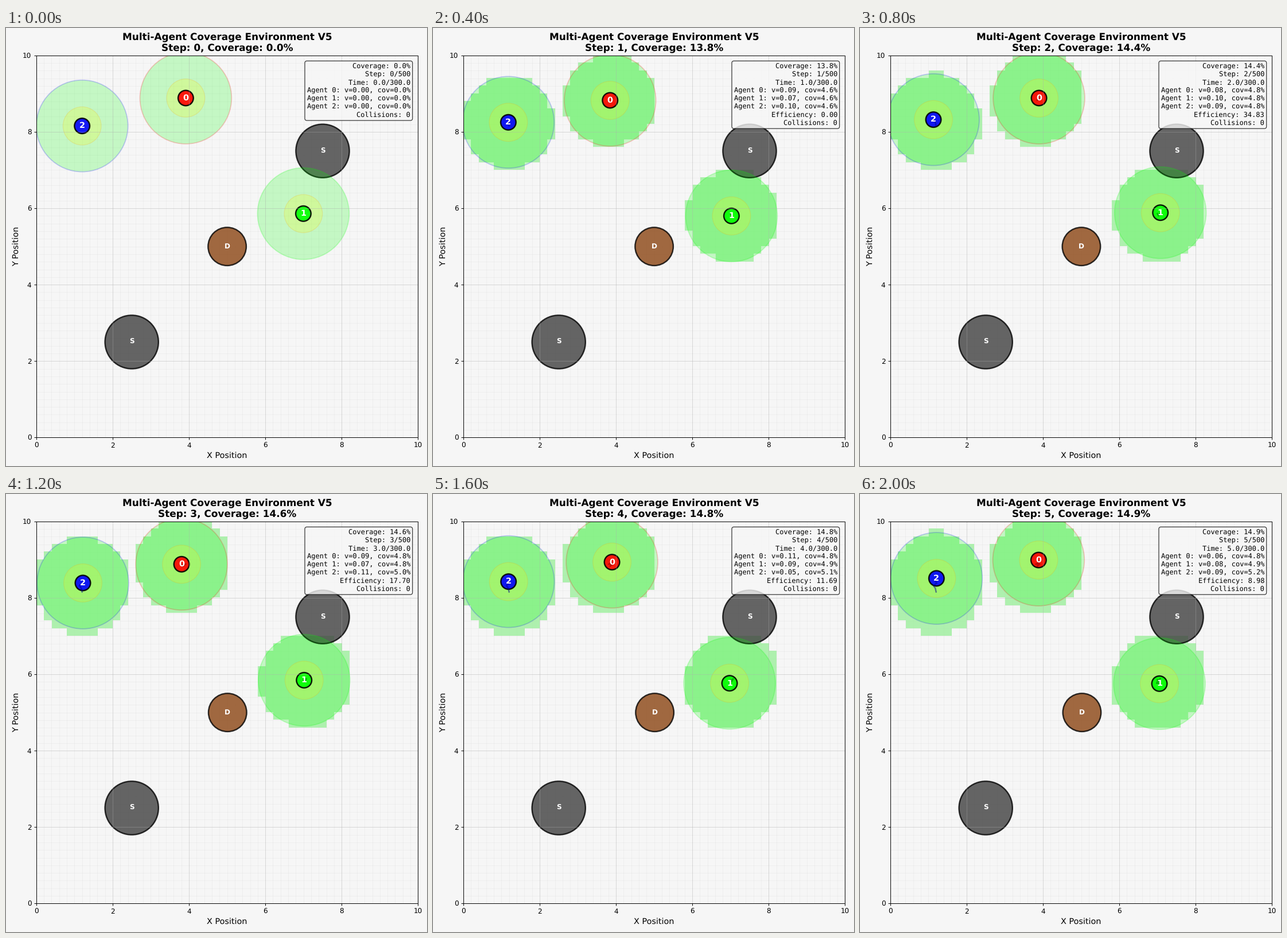
Animation, 734 px wide and 763 px high, one loop 2400 ms. Source, as a matplotlib script:

```python
import numpy as np
import matplotlib.pyplot as plt
from matplotlib.animation import FuncAnimation
from matplotlib.patches import Circle

W, H, DPI = 734, 763, 100
K = 0.867  # scale of all point sizes
BG = "#f6f6f6"
SIZE, CELL = 10, 0.2
SENSE, COMM, BODY = 1.2, 0.5, 0.2

plt.rcParams.update({
    "font.family": "DejaVu Sans",
    "font.size": 10 * K,
    "text.hinting": "none",
    "axes.linewidth": 0.8 * K,
    "axes.labelpad": 4 * K,
    "axes.titlepad": 6 * K,
})
for axis in ("xtick", "ytick"):
    plt.rcParams.update({f"{axis}.major.size": 3.5 * K,
                         f"{axis}.major.width": 0.8 * K,
                         f"{axis}.major.pad": 3.5 * K})

COLORS = [(1, 0, 0), (0, 1, 0), (0, 0, 1)]
TRAILS = ["darkred", "darkgreen", "darkblue"]

# way points of each agent; speed and coverage follow from them
PATHS = np.array([
    [(3.915, 8.885), (3.845, 8.825), (3.895, 8.885),
     (3.805, 8.88), (3.895, 8.935), (3.885, 8.99)],
    [(6.995, 5.86), (7.025, 5.80), (7.075, 5.885),
     (7.015, 5.845), (6.975, 5.765), (7.05, 5.755)],
    [(1.20, 8.155), (1.18, 8.25), (1.13, 8.32),
     (1.22, 8.39), (1.185, 8.425), (1.21, 8.51)],
])
STEPS = PATHS.shape[1]
EFFICIENCY = [0.00, 34.83, 17.70, 11.69, 8.98]  # from step 1 on

fig = plt.figure(figsize=(W / DPI, H / DPI), dpi=DPI, facecolor=BG)
left, top, side = 52.8, 47.8, 665.6
ax = fig.add_axes([left / W, 1 - (top + side) / H, side / W, side / H],
                  facecolor=BG)

# fine cell lines, covered cells, main grid
ticks = np.arange(0, SIZE + CELL / 2, CELL)
fine = dict(colors="gray", alpha=0.1, linewidth=0.5 * K, zorder=0.2)
ax.vlines(ticks, 0, SIZE, **fine)
ax.hlines(ticks, 0, SIZE, **fine)
mid = ticks[:-1] + CELL / 2
gx, gy = np.meshgrid(mid, mid)
cells = np.zeros(gx.shape + (4,))
cells[..., :3] = np.array([144, 238, 144]) / 255
cover = ax.imshow(cells, extent=(0, SIZE, 0, SIZE), origin="lower",
                  interpolation="nearest", aspect="auto", zorder=0.5)
ax.grid(True, color="#b0b0b0", alpha=0.4, linewidth=0.8 * K)

ax.set_xlim(0, SIZE)
ax.set_ylim(0, SIZE)
ax.set_xticks(range(0, SIZE + 1, 2))
ax.set_yticks(range(0, SIZE + 1, 2))
ax.set_xlabel("X Position", fontsize=12 * K)
ax.set_ylabel("Y Position", fontsize=12 * K)
title = ax.set_title("", fontsize=14 * K, fontweight="bold")


def disc(radius, face, edge, width, alpha, at=(0, 0)):
    return ax.add_patch(Circle(at, radius, facecolor=face, edgecolor=edge,
                               linewidth=width * K, alpha=alpha))


def label(text, size, at=(0, 0)):
    return ax.text(*at, text, color="white", fontsize=size * K,
                   fontweight="bold", ha="center", va="center")


def obstacle(at, radius, face, letter):
    return disc(radius, face, "black", 2, 0.8, at), label(letter, 10, at)


obstacle((2.5, 2.5), 0.7, "#404040", "S")
obstacle((7.5, 7.5), 0.7, "#404040", "S")
drifter = obstacle((5, 5), 0.5, "saddlebrown", "D")

agents, trails = [], []
for i, color in enumerate(COLORS):
    agents.append((
        disc(SENSE, "lime", color, 1.5, 0.2),
        disc(COMM, "yellow", "orange", 1, 0.2),
        disc(BODY, color, "black", 2, 0.9),
        label(str(i), 12),
    ))
    trails += ax.plot([], [], color=TRAILS[i], alpha=0.5, linewidth=2 * K)

info = ax.text(0.98, 0.98, "", transform=ax.transAxes, ha="right", va="top",
               fontsize=10 * K, family="DejaVu Sans Mono", linespacing=1.26,
               zorder=5,
               bbox=dict(boxstyle="round", facecolor="#f7f7f7",
                         edgecolor="black", alpha=0.8, linewidth=K))


def covered(path, step):
    """Cells whose centre one agent has had in sensing range so far."""
    seen = np.zeros(gx.shape, bool)
    for x, y in path[1:step + 1]:
        seen |= np.hypot(gx - x, gy - y) <= SENSE
    return seen


def speed(path, step):
    return np.hypot(*(path[step] - path[max(step - 1, 0)]))


def move(parts, at):
    for part in parts:
        if isinstance(part, Circle):
            part.center = tuple(at)
        else:
            part.set_position(at)


def report(step, total, seen):
    lines = [f"Coverage: {total:.1f}%",
             f"Step: {step}/500",
             f"Time: {step:.1f}/300.0"]
    for i, path in enumerate(PATHS):
        lines.append(f"Agent {i}: v={speed(path, step):.2f}, "
                     f"cov={100 * seen[i].mean():.1f}%")
    if step:
        lines.append(f"Efficiency: {EFFICIENCY[step - 1]:.2f}")
    lines.append("Collisions: 0")
    return "\n".join(lines)


def update(step):
    seen = [covered(path, step) for path in PATHS]
    union = np.any(seen, axis=0)
    total = 100 * union.mean()
    cells[..., 3] = 0.7 * union
    cover.set_data(cells)
    move(drifter, (5 + 0.005 * max(step - 1, 0), 5))
    for parts, trail, path in zip(agents, trails, PATHS):
        move(parts, path[step])
        trail.set_data(*path[:step + 1].T)
    title.set_text("Multi-Agent Coverage Environment V5\n"
                   f"Step: {step}, Coverage: {total:.1f}%")
    info.set_text(report(step, total, seen))
    return []


def reset():
    return update(0)


anim = FuncAnimation(fig, update, frames=STEPS, init_func=reset,
                     interval=400, repeat=True, repeat_delay=0, blit=False)
plt.show()
```
